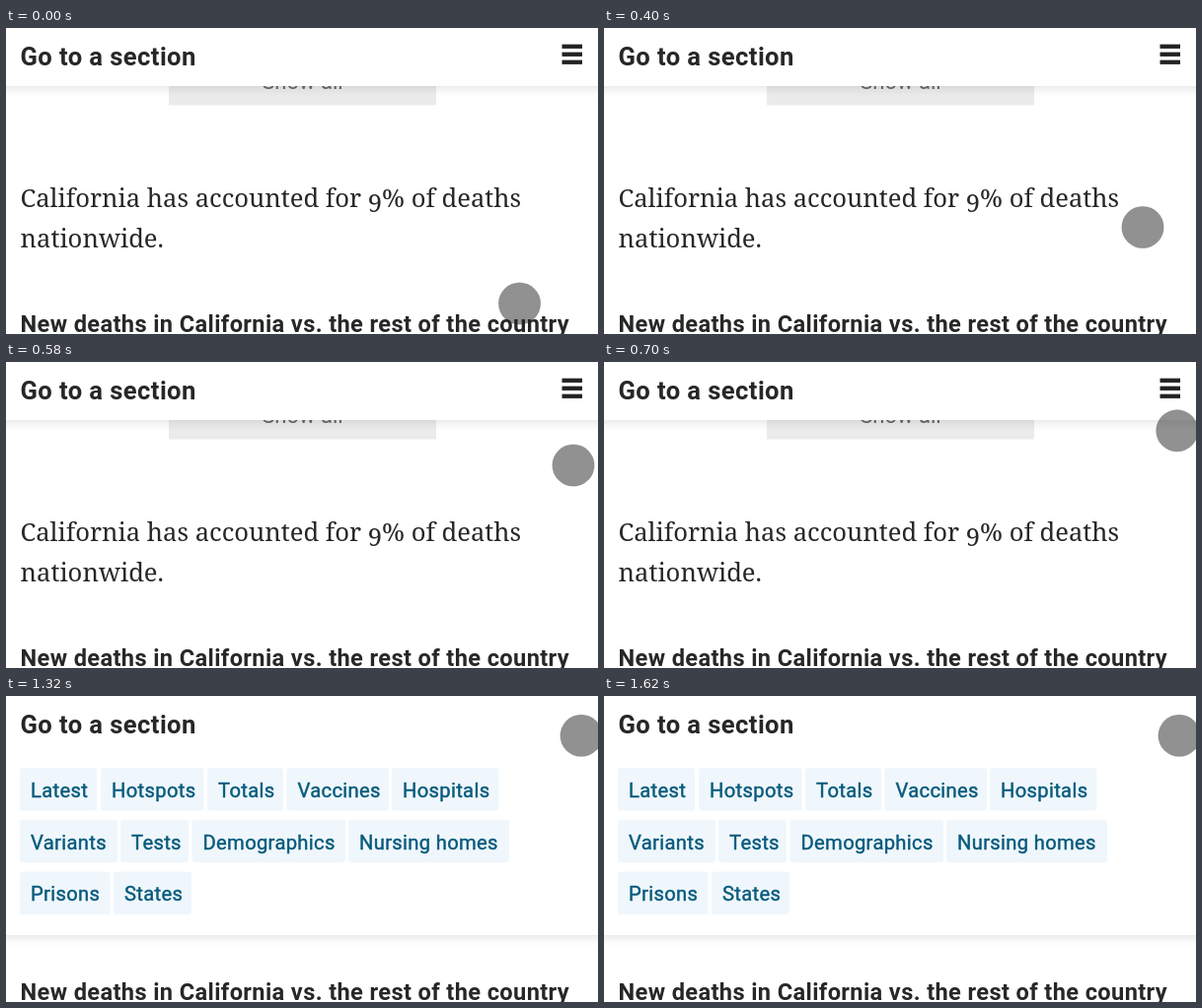
An HTML page with a canvas for the animation above (1.72 s loop, 600 by 311 pixels).

```html
<!DOCTYPE html>
<html lang="en">
<head>
<meta charset="utf-8">
<title>Section menu</title>
<style>
html, body { margin: 0; width: 100%; height: 100%; overflow: hidden; background: #fff; }
canvas { display: block; width: 600px; height: 311px; }
</style>
</head>
<body>
<canvas id="stage"></canvas>
<script>
const W = 600, H = 311, LOOP = 1720, STEP = 20, OPEN_AT = 1320;
const SANS = 'Roboto, "Liberation Sans", sans-serif';
const SERIF = '"Noto Serif", "Liberation Serif", serif';
const INK = '#272727', LEFT = 14.5, TRACK = 0.016;

const canvas = document.getElementById('stage');
const ctx = canvas.getContext('2d');
const ratio = window.devicePixelRatio || 1;
canvas.width = Math.round(W * ratio);
canvas.height = Math.round(H * ratio);

// Pointer path: time, x, y
const path = [
  [220, 520.5, 280], [300, 534.5, 245], [400, 546, 202.5],
  [580, 575, 105], [760, 582, 57], [880, 583, 40.3]
];

const menu = [
  { y: 73, chips: [['Latest', 14, 92], ['Hotspots', 96, 200.5], ['Totals', 204, 281],
                   ['Vaccines', 284.5, 388], ['Hospitals', 391, 499.5]] },
  { y: 125.7, chips: [['Variants', 14, 113], ['Tests', 116, 185],
                      ['Demographics', 188.5, 344], ['Nursing homes', 347, 510]] },
  { y: 178.4, chips: [['Prisons', 14, 105.5], ['States', 109, 188]] }
];

function slope(i, axis) {
  const last = path.length - 1;
  if (i === last) return 0;
  const a = path[Math.max(i - 1, 0)], b = path[i + 1];
  return (b[axis] - a[axis]) / (b[0] - a[0]);
}

// Cubic Hermite interpolation along the path
function along(t, axis) {
  const last = path.length - 1;
  if (t <= path[0][0]) return path[0][axis];
  if (t >= path[last][0]) return path[last][axis];
  let i = 0;
  while (t >= path[i + 1][0]) i++;
  const a = path[i], b = path[i + 1], d = b[0] - a[0];
  const u = (t - a[0]) / d, u2 = u * u, u3 = u2 * u;
  return (2 * u3 - 3 * u2 + 1) * a[axis] + (u3 - 2 * u2 + u) * d * slope(i, axis)
       + (3 * u2 - 2 * u3) * b[axis] + (u3 - u2) * d * slope(i + 1, axis);
}

function text(str, x, y, font, color, { track = 0, weight = 0, align = 'left' } = {}) {
  ctx.font = font;
  ctx.textAlign = align;
  ctx.letterSpacing = track + 'px';
  ctx.fillStyle = ctx.strokeStyle = color;
  ctx.fillText(str, x, y);
  if (weight) {
    ctx.lineWidth = weight;
    ctx.lineJoin = 'round';
    ctx.strokeText(str, x, y);
  }
  return x + ctx.measureText(str).width;
}

function heading(str, y, size) {
  text(str, LEFT, y, `bold ${size}px ${SANS}`, INK, { track: size * TRACK });
}

function prose(str, x, y) {
  return text(str, x, y, `25.6px ${SERIF}`, INK);
}

function page() {
  ctx.fillStyle = '#fff';
  ctx.fillRect(0, 0, W, H);
  ctx.fillStyle = '#ebebeb';
  ctx.fillRect(165, 30, 271, 48.5);
  text('Show all', 300.5, 62, `22px ${SANS}`, '#666', { align: 'center' });

  // The digit hangs below the line like an old-style figure
  let x = prose('California has accounted for ', LEFT, 182);
  x = prose('9', x, 187);
  prose('% of deaths', x, 182);
  prose('nationwide.', LEFT, 222.5);
  heading('New deaths in California vs. the rest of the country', 309, 23.6);
}

function panel(height) {
  ctx.save();
  ctx.shadowColor = 'rgba(0,0,0,.14)';
  ctx.shadowBlur = 11 * ratio;
  ctx.shadowOffsetY = ratio;
  ctx.fillStyle = '#fff';
  ctx.fillRect(-20, -20, W + 40, height + 20);
  ctx.restore();
  heading('Go to a section', 37.7, 25.6);
}

function burger() {
  ctx.fillStyle = '#222';
  for (let i = 0; i < 3; i++) ctx.fillRect(563.5, 16.6 + i * 8, 20.5, 4.3);
}

function chips() {
  const size = 20.2;
  for (const row of menu) {
    for (const [label, left, right] of row.chips) {
      ctx.fillStyle = '#eff7fc';
      ctx.beginPath();
      ctx.roundRect(left, row.y, right - left, 43.5, 3);
      ctx.fill();
      text(label, left + 11, row.y + 29.8, `${size}px ${SANS}`, '#075a7c',
        { track: size * TRACK, weight: 0.45 });
    }
  }
}

function pointer(t) {
  ctx.beginPath();
  ctx.arc(along(t, 1), along(t, 2), 21.3, 0, Math.PI * 2);
  ctx.fillStyle = 'rgba(34,34,34,.495)';
  ctx.fill();
  ctx.strokeStyle = 'rgba(0,0,0,.08)';
  ctx.lineWidth = 1;
  ctx.stroke();
}

function draw(t) {
  ctx.setTransform(ratio, 0, 0, ratio, 0, 0);
  page();
  if (t < OPEN_AT) {
    panel(59);
    burger();
  } else {
    panel(243);
    chips();
  }
  pointer(t);
}

const start = performance.now();
function tick() {
  const t = (performance.now() - start) % LOOP;
  draw(Math.floor(t / STEP) * STEP);
  requestAnimationFrame(tick);
}
tick();
</script>
</body>
</html>
```
